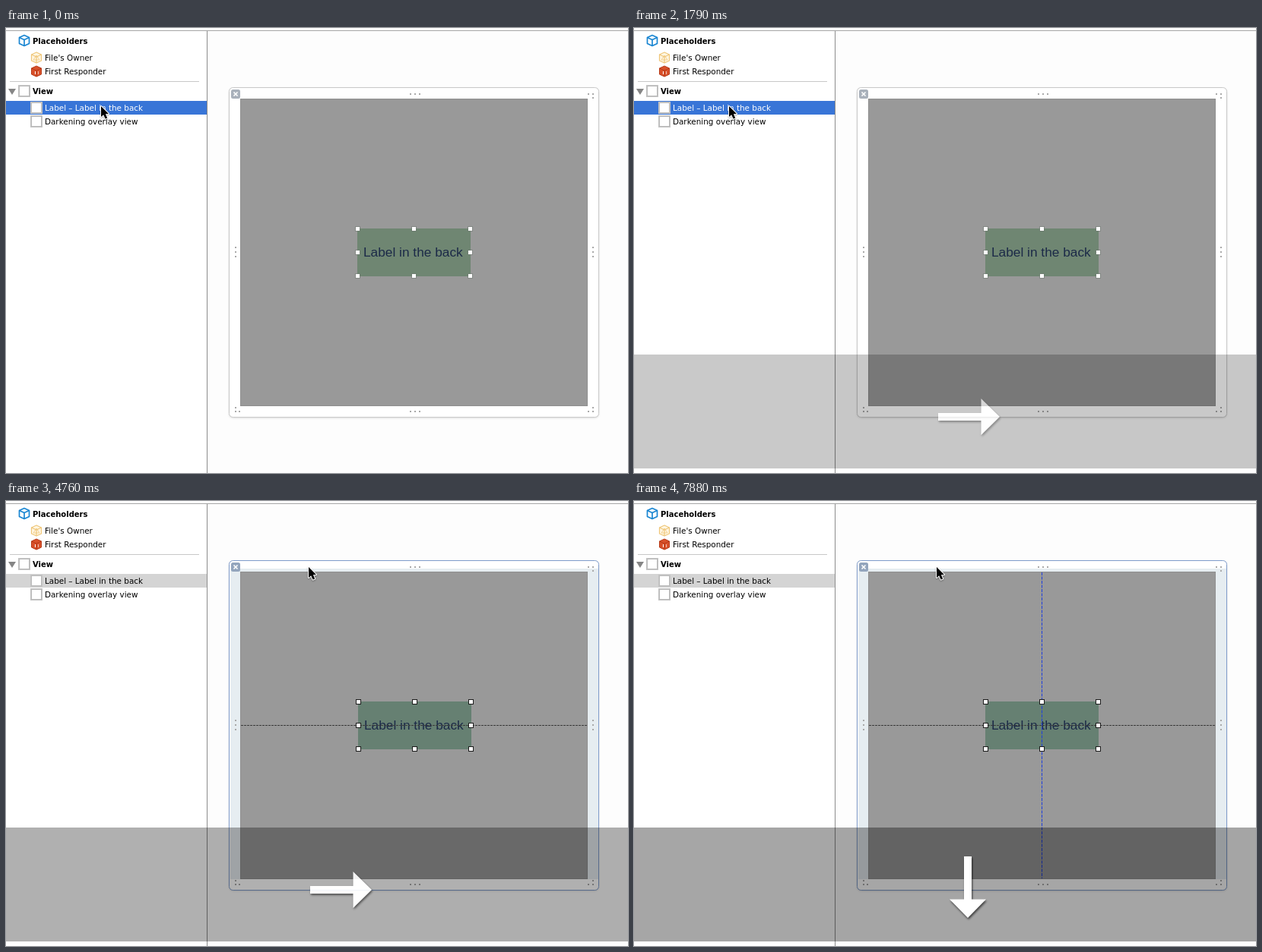
An HTML page with a canvas for the animation above (8000 ms loop, 818 px wide and 586 px high).

```html
<!DOCTYPE html>
<html lang="en">
<head>
<meta charset="utf-8">
<title>Nudging a label</title>
<style>
html, body { margin: 0; width: 100%; height: 100%; overflow: hidden; background: #fff; }
canvas { display: block; }
</style>
</head>
<body>
<canvas id="stage" width="818" height="586"></canvas>
<script>
const W = 818, H = 586, LOOP = 8000, FOCUS = 3720;
const stage = document.getElementById('stage').getContext('2d');
const layer = document.createElement('canvas');
layer.width = W;
layer.height = H;
const bezel = layer.getContext('2d');
let g = stage;

// Times at which each arrow key nudges the label by one pixel
const presses = {
  right: [4760, 4900, 5200, 5350, 5500],
  up: [5650, 5800, 5950, 6090],
  left: [6240, 6390, 6540, 6840, 6990],
  down: [7290, 7590, 7740, 7880]
};
const angles = { right: 0, up: -Math.PI / 2, left: Math.PI, down: Math.PI / 2 };
const bezelAlpha = [[0, 0], [600, .89], [750, 1], [1490, .855], [1640, .73], [1790, .61],
  [1940, .49], [2240, .24], [2390, 0], [4760, .89], [4900, 1]];
const cursorPath = [[0, 125, 103], [2830, 160, 98], [2980, 246, 88], [3120, 326, 79],
  [3270, 382, 82], [3420, 398, 87]];

const latest = (keys, t) => keys.filter(k => k[0] <= t).pop();
const count = (dir, t) => presses[dir].filter(p => p <= t).length;

function rect(x, y, w, h, color) {
  g.fillStyle = color;
  g.fillRect(x, y, w, h);
}

function path(points, closed = true) {
  g.beginPath();
  points.forEach(([x, y]) => g.lineTo(x, y));
  if (closed) g.closePath();
}

function stroke(color, width = 1) {
  g.strokeStyle = color;
  g.lineWidth = width;
  g.stroke();
}

function fill(color) {
  g.fillStyle = color;
  g.fill();
}

function text(str, x, y, color = '#000', font = '10.4px "DejaVu Sans", sans-serif') {
  g.font = font;
  g.fillStyle = color;
  g.fillText(str, x, y);
}

function cube(x, y, line, body, width) {
  const pts = [[0, -7], [6.5, -4], [6.5, 4], [0, 7], [-6.5, 4], [-6.5, -4]];
  g.save();
  g.translate(x, y);
  g.lineJoin = 'round';
  path(pts);
  fill(body);
  stroke(line, width);
  path([[-6.5, -4], [0, -1], [6.5, -4]], false);
  stroke(line, width);
  path([[0, -1], [0, 7]], false);
  stroke(line, width);
  g.restore();
}

function viewIcon(x, y) {
  rect(x, y, 16, 16, '#fff');
  g.setLineDash([1, 1]);
  g.strokeStyle = '#777';
  g.lineWidth = 1;
  g.strokeRect(x + 1.5, y + 1.5, 13, 13);
  g.setLineDash([]);
  g.strokeStyle = '#c4c4c4';
  g.strokeRect(x + .5, y + .5, 15, 15);
}

function sidebar(focused) {
  const bold = 'bold 10px "DejaVu Sans", sans-serif';
  rect(0, 0, 264, H, '#fff');
  rect(5, 70, 249, 1, '#c8c8c8');
  rect(0, 96, 264, 18, focused ? '#d4d4d4' : '#3875d7');

  cube(24, 16.5, '#1a86d2', '#fff', 1.7);
  cube(40, 39, '#efc679', '#fff6e2', 1.2);
  path([[40, 36], [44, 42], [36, 42]]);
  stroke('#efc679', .8);
  cube(40, 57, '#b73a18', '#d9512a', 1);
  rect(38, 57, 1, 4, '#fff');
  rect(42, 57, 1, 4, '#f3c0ae');

  path([[3, 80], [13, 80], [8, 88]]);
  fill('#858585');
  viewIcon(16, 75);
  viewIcon(32, 97);
  viewIcon(32, 115);

  text('Placeholders', 35, 21, '#000', bold);
  text("File's Owner", 51, 43);
  text('First Responder', 51, 61);
  text('View', 35, 87, '#000', bold);
  text('Label – Label in the back', 51, 109, focused ? '#000' : '#fff');
  text('Darkening overlay view', 51, 127);
}

function dots(points) {
  points.forEach(([x, y]) => rect(x - 1, y - 1, 2, 2, '#a9a9a9'));
}

function frame(t, focused) {
  g.save();
  g.shadowColor = 'rgba(0,0,0,.16)';
  g.shadowBlur = 3;
  g.shadowOffsetY = 1;
  g.beginPath();
  g.roundRect(293.5, 78.5, 486, 434, 5);
  fill('#fff');
  g.restore();

  if (focused) {
    rect(295, 89, 484, 409, '#e6edf1');
  } else if (t >= 2390) {
    rect(294, 430, 485, 82, '#f4f4f4');
  }
  g.beginPath();
  g.roundRect(293.5, 78.5, 486, 434, 5);
  stroke(focused ? '#7f9ccb' : '#c9c9c9');

  g.beginPath();
  g.roundRect(296, 81, 12, 12, 2.5);
  fill(focused ? '#93a5bd' : '#a9b1bb');
  path([[299.5, 84.5], [304.5, 89.5]], false);
  stroke('#fff', 1.6);
  path([[304.5, 84.5], [299.5, 89.5]], false);
  stroke('#fff', 1.6);

  for (const d of [-6, 0, 6]) {
    dots([[538 + d, 87], [538 + d, 505], [302, 295 + d], [772, 295 + d]]);
  }
  dots([[766, 87], [772, 87], [772, 92], [302, 500], [302, 505], [307, 505],
    [772, 500], [766, 505], [772, 505]]);

  rect(308, 93, 457, 405, '#8f8f8f');
  rect(309, 94, 455, 403, '#999');
}

function guide(points, color, dash) {
  g.setLineDash(dash);
  path(points, false);
  stroke(color);
  g.setLineDash([]);
}

function label(t, focused) {
  const dx = count('right', t) - count('left', t);
  const dy = count('down', t) - count('up', t);
  const x = 462 + dx, y = 264 + dy;

  rect(x, y, 149, 63, focused ? '#668072' : '#6f8672');
  text('Label in the back', x + 8, y + 37, '#1c2a48',
    '17.3px "Liberation Sans", Arial, sans-serif');

  if (t >= presses.right[0] && dy === 0) {
    guide([[309, 295.5], [764, 295.5]], '#3c3c3c', [3, 1]);
  }
  if (t >= presses.left[0] && dx === 0) {
    guide([[536.5, 94], [536.5, 497]], '#1f40dc', [4, 1.5]);
  }

  for (const hx of [0, 74, 148]) {
    for (const hy of [0, 31, 62]) {
      if (hx === 74 && hy === 31) continue;
      const cx = x + hx, cy = y + hy;
      if (focused) rect(cx - 3, cy - 3, 7, 7, '#1c1c1c');
      else rect(cx - 3, cy - 3, 7, 7, 'rgba(110,120,112,.5)');
      rect(cx - 2, cy - 2, 5, 5, '#fff');
    }
  }
}

function cursor(x, y) {
  g.save();
  g.translate(x, y);
  g.shadowColor = 'rgba(0,0,0,.35)';
  g.shadowBlur = 2;
  g.shadowOffsetY = 1;
  path([[0, 0], [0, 14], [3.2, 11.2], [5.6, 16.6], [8.2, 15.5], [5.9, 10.2], [10, 10]]);
  g.lineJoin = 'round';
  stroke('#fff', 2);
  g.shadowColor = 'transparent';
  fill('#000');
  g.restore();
}

function keyBezel(t) {
  const alpha = latest(bezelAlpha, t)[1];
  if (!alpha) return;
  const dir = Object.keys(presses).filter(d => presses[d][0] <= t).pop() || 'right';
  const vertical = dir === 'up' || dir === 'down';

  g = bezel;
  g.clearRect(0, 0, W, H);
  rect(0, 430, W, 150, 'rgba(0,0,0,.35)');
  g.save();
  g.shadowColor = 'rgba(0,0,0,.65)';
  g.shadowBlur = 3;
  g.shadowOffsetX = 1;
  g.shadowOffsetY = 2;
  g.translate(vertical ? 439 : 440.5, vertical ? 508.5 : 512);
  g.rotate(angles[dir]);
  path([[-40.5, -5], [16, -5], [16, -24], [40.5, 0], [16, 24], [16, 5], [-40.5, 5]]);
  fill('#fff');
  g.restore();

  g = stage;
  g.globalAlpha = alpha;
  g.drawImage(layer, 0, 0);
  g.globalAlpha = 1;
}

function draw(t) {
  const focused = t >= FOCUS;
  rect(0, 0, W, H, '#fdfdfd');
  sidebar(focused);
  rect(0, 3, W, 1, '#a6a6a6');
  rect(264, 4, 1, H - 4, '#8c8c8c');
  frame(t, focused);
  label(t, focused);
  const [, x, y] = latest(cursorPath, t);
  cursor(x, y);
  keyBezel(t);
}

const start = performance.now();
function tick() {
  draw((performance.now() - start) % LOOP);
  requestAnimationFrame(tick);
}
tick();
</script>
</body>
</html>
```
